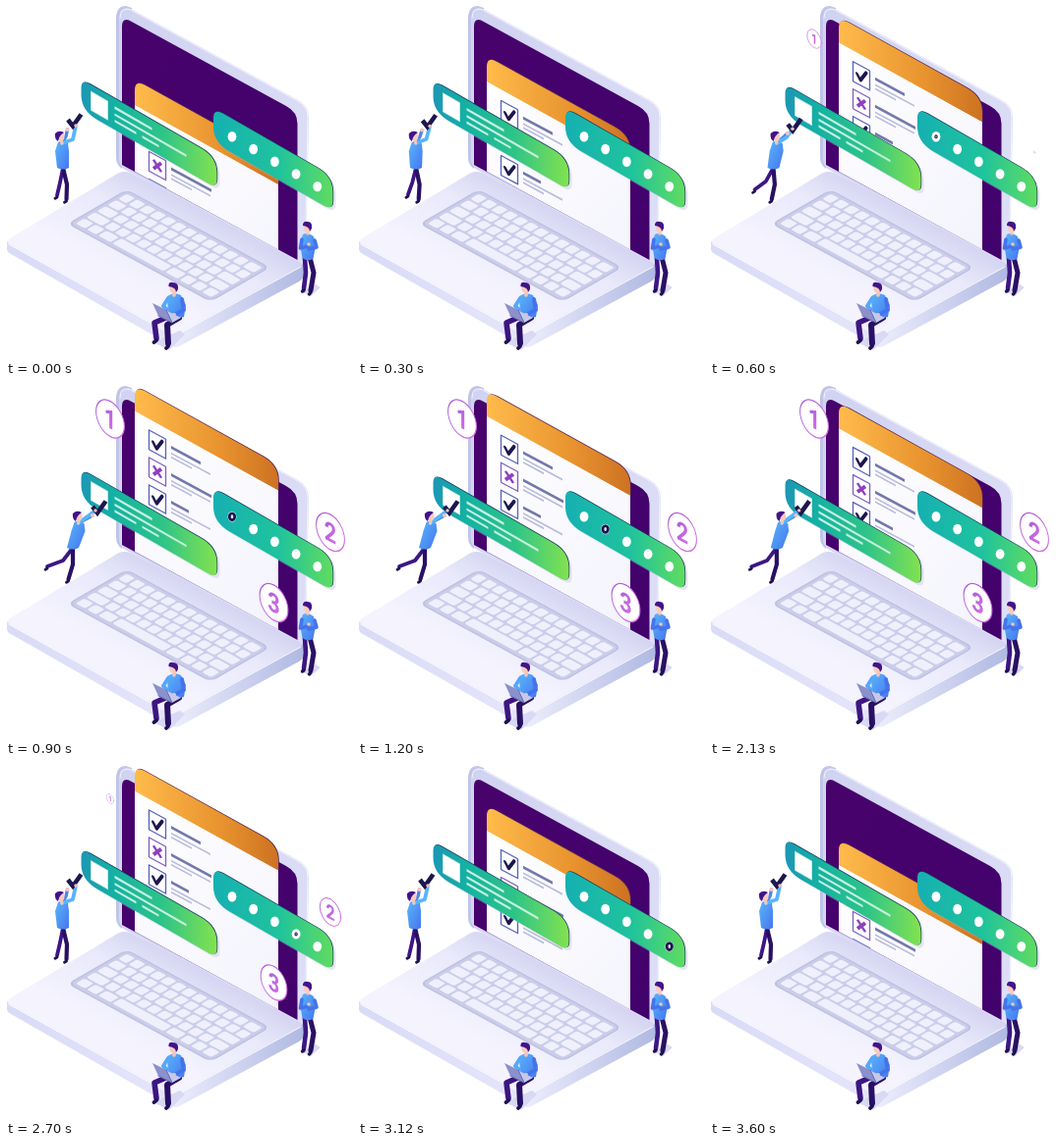
These frames come from a looping animation (352 by 359 pixels, 3.63 s). An HTML page:

```html
<!DOCTYPE html>
<html lang="en">
<head>
<meta charset="utf-8">
<title>Survey on a laptop</title>
<style>
html, body { margin: 0; width: 100%; height: 100%; overflow: hidden; background: #fff; }
svg { display: block; width: 352px; height: 359px; }
text { font: 700 27px Roboto, Arial, sans-serif; text-anchor: middle; }
</style>
</head>
<body>
<svg viewBox="0 0 352 359" fill="none" stroke-linecap="round" stroke-linejoin="round">
  <defs>
    <linearGradient id="top" gradientUnits="userSpaceOnUse" x1="208" y1="208" x2="158" y2="298">
      <stop offset="0" stop-color="#d3d3f1"/><stop offset=".4" stop-color="#e9e9fb"/><stop offset="1" stop-color="#f4f3fe"/>
    </linearGradient>
    <linearGradient id="side"><stop offset="0" stop-color="#d9dbf7"/><stop offset="1" stop-color="#e6e6fa"/></linearGradient>
    <linearGradient id="side2"><stop offset="0" stop-color="#ececfc"/><stop offset="1" stop-color="#b0b9e2"/></linearGradient>
    <linearGradient id="frame" x1="0" y1="0" x2="1" y2="1">
      <stop offset="0" stop-color="#d0d3f1"/><stop offset="1" stop-color="#dfdff7"/>
    </linearGradient>
    <linearGradient id="screen" x1="0" y1="0" x2="1" y2="1">
      <stop offset="0" stop-color="#48026c"/><stop offset="1" stop-color="#42026c"/>
    </linearGradient>
    <linearGradient id="orange">
      <stop offset="0" stop-color="#ffbb4b"/><stop offset=".6" stop-color="#e8932f"/><stop offset="1" stop-color="#cd7222"/>
    </linearGradient>
    <linearGradient id="paper" x1="0" y1="0" x2="1" y2="1">
      <stop offset="0" stop-color="#ffffff"/><stop offset="1" stop-color="#f0f0fc"/>
    </linearGradient>
    <linearGradient id="green">
      <stop offset="0" stop-color="#1c97b4"/><stop offset=".25" stop-color="#14b2a2"/>
      <stop offset=".6" stop-color="#2ec488"/><stop offset="1" stop-color="#83e24e"/>
    </linearGradient>
    <linearGradient id="teal">
      <stop offset="0" stop-color="#16b0b2"/><stop offset=".55" stop-color="#1fc39c"/><stop offset="1" stop-color="#60dc60"/>
    </linearGradient>
    <linearGradient id="violet" x1="0" y1="0" x2="1" y2="1">
      <stop offset="0" stop-color="#a45cd8"/><stop offset="1" stop-color="#dd70e6"/>
    </linearGradient>
    <linearGradient id="shirt" x1="0" y1="0" x2="1" y2="1">
      <stop offset="0" stop-color="#58b6fb"/><stop offset="1" stop-color="#4676ee"/>
    </linearGradient>
    <clipPath id="hinge"><path d="M100-20H320V272L118.500 162H100Z"/></clipPath>
  </defs>

  <!-- laptop base -->
  <path fill="url(#side)" d="M1 240V248Q1 251 5 253L166 345Q172 349 174 347V333Z"/>
  <path fill="url(#side2)" d="M172 333V348Q176 348 180 345L298 281Q303 278 303 274V262Z"/>
  <path fill="url(#top)" d="M4 237L110 173Q118 167 126 170L299 258Q305 262 299 266L178 332Q172 336 165 332L4 243Q-1 240 4 237Z"/>
  <path stroke="#fff" stroke-width="1" d="M3 243L165 333Q172 336 178 333L300 266"/>
  <g id="keys" transform="matrix(1.035 .565 -1.03 .595 123 187)"></g>

  <!-- laptop screen -->
  <path fill="#c0c4e8" d="M112 13Q112 0 122 0L128 2L118 166Q112 162 112 154Z"/>
  <path fill="url(#frame)" d="M115 13Q115 0 126 2.500L297 96Q308 102 308 114L305 258Q304 264 298 261L121 167Q115 163 115 156Z"/>
  <path stroke="#f3f3ff" stroke-width="1" d="M116 12Q116 1 126 3.500L297 97Q307 103 307 114L305 222"/>
  <path fill="url(#screen)" d="M118 21Q118 11 127 15.500L285 102Q296.500 108 296.500 120V259L118 162Z"/>

  <g clip-path="url(#hinge)"><g id="doc"></g></g>
  <g id="card"></g>
  <g id="poll"></g>
  <g id="badges"></g>

  <!-- person by the screen -->
  <path fill="#d9d9f4" d="M300 291L315 284L320 287L310 296Z"/>
  <path stroke="#3d1683" stroke-width="4.600" d="M304 257L305 272L303 288"/>
  <path stroke="#2a1064" stroke-width="5" d="M309 256L313 272L310 290"/>
  <path stroke="#1f0f50" stroke-width="3.400" d="M303 290L301.500 291M310 292L308.500 294"/>
  <path fill="url(#shirt)" d="M302 233Q307 230 313 235L315 245L312.500 258Q307 261 301.500 257L299 243Z"/>
  <path stroke="#4573ea" stroke-width="3.600" d="M301 238L299.500 247L307 245M314 239L316 246L308 248"/>
  <circle cx="308" cy="243" r="1.800" fill="#f7c4ba"/>
  <path stroke="#f7c4ba" stroke-width="3.600" d="M307 229V232"/>
  <ellipse cx="306.500" cy="226" rx="3.500" ry="4.500" fill="#f9cbbf"/>
  <path fill="#421488" d="M302 224Q302 219 307 220Q312 220 311 227L309 230Q309 225 302 224Z"/>

  <!-- seated person -->
  <path fill="#d9d9f4" d="M150 343L177 331L182 335L166 351Z"/>
  <path stroke="#2a1064" stroke-width="6" d="M176 318L164 325L165 344"/>
  <path stroke="#3d1683" stroke-width="5.600" d="M167 316L151 323L153 339"/>
  <path stroke="#1f0f50" stroke-width="3.800" d="M153 341L150.500 343M165 347L163 349"/>
  <path fill="url(#shirt)" d="M164 296Q171 291 178 295L183 305L181 317Q172 321 165 316Z"/>
  <path stroke="#55a9f9" stroke-width="4" d="M165 298L160 306L164 310"/>
  <path stroke="#4573ea" stroke-width="4" d="M179 299L181 310L173 314"/>
  <circle cx="171" cy="315" r="2" fill="#f7c4ba"/>
  <path fill="#c6caea" d="M155 316L169 323L178 318L164 311Z"/>
  <path fill="#8b91cd" d="M149 303L163 310L169 323L155 316Z"/>
  <path stroke="#646bb0" stroke-width="1" d="M163 310L169 323L155 316"/>
  <path stroke="#f7c4ba" stroke-width="3.600" d="M171 291V295"/>
  <ellipse cx="170" cy="288" rx="3.700" ry="4.700" fill="#f9cbbf"/>
  <path fill="#421488" d="M165.500 286Q165 281 170 282Q176 282 175 289L173 292Q173 287 165.500 286Z"/>

  <g id="man"></g>
</svg>
<script>
const LOOP = 3630, INK = '#1d164f';
const $ = id => document.getElementById(id);
const mix = (a, b, p) => a + (b - a) * p;
const ease = u => { u = Math.max(0, Math.min(1, u)); return u * u * (3 - 2 * u); };
const ramp = (t, a, b) => ease((t - a) / (b - a));
const pulse = (t, a, b, c, d) => ramp(t, a, b) * (1 - ramp(t, c, d));
// value along [time, value] keys, eased between neighbours
function track(t, keys) {
  let v = keys[0][1];
  for (let i = 1; i < keys.length; i++)
    v += (keys[i][1] - keys[i - 1][1]) * ramp(t, keys[i - 1][0], keys[i][0]);
  return v;
}
const path = (d, attrs) => `<path d="${d}" ${attrs}/>`;
const line = (x1, x2, y, color, w) =>
  path(`M${x1} ${y}H${x2}`, `stroke="${color}" stroke-width="${w}" stroke-linecap="butt"`);
const skew = (x, y, k) => `matrix(1 ${k} 0 1 ${x} ${y})`;
const ISO = .577;
// panel with two round and two tighter corners
const leaf = (w, h, r, q) =>
  `M0 ${r}Q0 0 ${r} 0H${w - q}Q${w} 0 ${w} ${q}V${h - r}Q${w} ${h} ${w - r} ${h}H${q}Q0 ${h} 0 ${h - q}Z`;

function keyboard() {
  let s = '<rect width="141" height="59" rx="6" fill="#bfc1e2"/>' +
    '<rect x="1.500" y="1.500" width="138" height="56" rx="5" fill="#cbcdea"/>';
  const key = (x, y, w) =>
    `<rect x="${x}" y="${y}" width="${w}" height="8.600" rx="2" fill="#eff0fc"/>`;
  for (let r = 0; r < 5; r++) {
    const y = 4 + r * 10.5, wide = 8 + r * 2.5;
    if (r == 4) {
      for (const [x, w] of [[4, 9], [15, 9], [26, 12], [40, 50], [92, 12], [106, 9], [117, 9], [128, 9]])
        s += key(x, y, w);
      continue;
    }
    s += key(4, y, wide);
    let x = 6 + wide;
    while (x + 18 < 137) { s += key(x, y, 8.4); x += 10.2; }
    s += key(x, y, 137 - x);
  }
  return s;
}

function row(y, bar, kind) {
  const check = kind == 'check', c = check ? '#5b67bd' : '#8064c4';
  let s = `<g transform="${skew(154, y, .54)}">` +
    `<rect x="-8.500" y="-10" width="17" height="20" fill="#fff" stroke="${c}" stroke-width="1.400"/>`;
  s += check
    ? path('M-4.500 0L-1 5L5 -6', `stroke="${INK}" stroke-width="3"`)
    : path('M-4 -4L4 4M4 -5L-4 5', 'stroke="#8f3fc0" stroke-width="3" stroke-linecap="butt"');
  return s + line(14, 14 + bar, -4.5, '#7478ab', 3) + line(14, 54, 1.5, '#b9bbdb', 1.8) +
    line(14, 35, 5.5, '#b9bbdb', 1.8) + '</g>';
}

function sheet() {
  const head = 'M0 26V11Q0 0 10 0H130Q146 0 146 16V26Z';
  return `<g transform="${skew(131, -88, .555)}">` +
    path('M0 25H146V260H0Z', 'fill="url(#paper)"') +
    path(head, 'fill="#5a2850" transform="translate(.8 -.8)"') +
    path(head, 'fill="url(#orange)"') + '</g>' +
    row(-28, 30, 'check') + row(0, 41, 'cross') + row(28, 18, 'check');
}

function panel(w, h, r, q, fill, inner) {
  const d = leaf(w, h, r, q);
  return path(d, 'fill="#b9b8e2" opacity=".35" transform="translate(3 1)"') +
    path(d, 'fill="#17375c" transform="translate(.7 -.8)"') +
    path(d, `fill="${fill}"`) + inner;
}

$('keys').innerHTML = keyboard();
$('doc').innerHTML = sheet();
$('card').innerHTML = panel(138, 32, 9, 16, 'url(#green)',
  '<rect x="10" y="7" width="17" height="19" fill="#fff" stroke="#cdeee4" stroke-width=".800"/>' +
  line(34, 72, 9.5, '#c4efe0', 2.6) + line(34, 107, 16.5, '#c4efe0', 2.4) +
  line(34, 56, 23, '#c4efe0', 2.4) + line(62, 79, 23, '#c4efe0', 2.4));

const SPOTS = [0, 1, 2, 3, 4].map(i => [230 + 21.7 * i, 133.3 + 12.7 * i]);
$('poll').innerHTML = `<g transform="${skew(211, 104, ISO)}">` +
  panel(121.5, 35, 10, 16, 'url(#teal)', '') + '</g>' +
  SPOTS.map(([x, y]) => `<ellipse cx="${x}" cy="${y}" rx="4.400" ry="5.200" fill="#fff"/>` +
    `<g class="pick"><ellipse rx="2.700" ry="3.400" fill="#dfe6ff" stroke="${INK}" stroke-width="2.800"/></g>`).join('');
const picks = [...document.querySelectorAll('.pick')];
const PICK_TIMES = [[560, 1070], [1090, 1600], [1620, 2110], [2190, 2735], [2745, 3240]];

const BADGES = [
  [106, 33.5, 480, 720, 2540, 2780],
  [330, 149, 560, 780, 2620, 2860],
  [272.5, 221, 640, 860, 2660, 2900]
];
$('badges').innerHTML = BADGES.map((b, i) =>
  '<g class="badge"><circle r="18" fill="#fff" stroke="url(#violet)" stroke-width="1.300"/>' +
  `<text y="9.700" fill="url(#violet)">${i + 1}</text></g>`).join('');
const badges = [...document.querySelectorAll('.badge')];

// each joint: x, y standing, then x, y reaching
const JOINTS = {
  head: [55, 133, 73, 133], neck: [57, 140, 73.5, 140], hip: [58, 165, 68, 165],
  kneeL: [55, 180, 58, 178], footL: [52, 193, 42, 184],
  kneeR: [62, 182, 68, 182], footR: [61.5, 197, 63.5, 197],
  elbowL: [61, 133, 79, 137], handL: [62.5, 126, 88, 132],
  elbowR: [68, 136, 83, 133], handR: [71, 122, 91, 127],
  mark: [70, 118, 95, 125]
};

function man(p) {
  const j = {};
  for (const k in JOINTS) {
    const [a, b, c, d] = JOINTS[k];
    j[k] = [mix(a, c, p), mix(b, d, p)];
  }
  const limb = (ids, color, w) =>
    path('M' + ids.split(' ').map(k => j[k].join(' ')).join('L'), `stroke="${color}" stroke-width="${w}"`);
  const shoe = ([x, y]) => path(`M${x} ${y + 2}l-2 1.200`, 'stroke="#1f0f50" stroke-width="2.800"');
  const [nx, ny] = j.neck, [hx, hy] = j.hip, [cx, cy] = j.head, [mx, my] = j.mark;
  const body = `M${nx - 4} ${ny - 1}Q${nx} ${ny - 4} ${nx + 6} ${ny}L${nx + 7} ${ny + 8}` +
    `L${hx + 6} ${hy}Q${hx} ${hy + 3} ${hx - 6} ${hy}L${nx - 7} ${ny + 8}Z`;
  return limb('hip kneeL footL', '#3d1683', 3.8) + limb('hip kneeR footR', '#2a1064', 4.2) +
    shoe(j.footL) + shoe(j.footR) +
    limb('neck elbowL handL', '#4a86f0', 3.4) +
    path(body, 'fill="url(#shirt)"') +
    limb('neck elbowR handR', '#5ab4fa', 3.8) +
    `<circle cx="${j.handL[0]}" cy="${j.handL[1]}" r="2" fill="#f7c4ba"/>` +
    path(`M${mx - 7} ${my - 2}l5 6.500l8.500 -12`, `stroke="${INK}" stroke-width="4.600" stroke-linecap="butt" stroke-linejoin="miter"`) +
    `<circle cx="${j.handR[0]}" cy="${j.handR[1]}" r="1.700" fill="#f7c4ba"/>` +
    path(`M${cx + 1} ${cy + 3}L${nx} ${ny}`, 'stroke="#f7c4ba" stroke-width="3.200"') +
    `<ellipse cx="${cx + 1}" cy="${cy}" rx="3.500" ry="4.500" fill="#f9cbbf"/>` +
    path(`M${cx + 4} ${cy - 4}q-5 -3 -9 1q-1 5 3 8q1 -6 6 -9z`, 'fill="#421488"');
}

function draw(t) {
  const y = track(t, [[0, 163], [800, 87.5], [950, 87.5], [1720, 109], [1920, 109], [2700, 87.5], [3500, 163]]);
  $('doc').setAttribute('transform', `translate(0 ${y})`);
  const drop = track(t, [[0, 0], [1700, 19], [1900, 19], [3500, 0]]);
  $('card').setAttribute('transform', skew(76.5, 74.5 + drop, ISO));
  picks.forEach((g, i) => {
    const [a, b] = PICK_TIMES[i];
    g.setAttribute('transform', `translate(${SPOTS[i]}) scale(${pulse(t, a, a + 90, b - 80, b)})`);
  });
  badges.forEach((g, i) => {
    const [x, y, ...times] = BADGES[i], s = pulse(t, ...times);
    g.setAttribute('transform', `matrix(${.8 * s} ${.43 * s} 0 ${s} ${x} ${y})`);
  });
  $('man').innerHTML = man(pulse(t, 150, 900, 2080, 2680));
}

let start;
function tick(now) {
  start ??= now;
  draw((now - start) % LOOP);
  requestAnimationFrame(tick);
}
draw(0);
requestAnimationFrame(tick);
</script>
</body>
</html>
```
